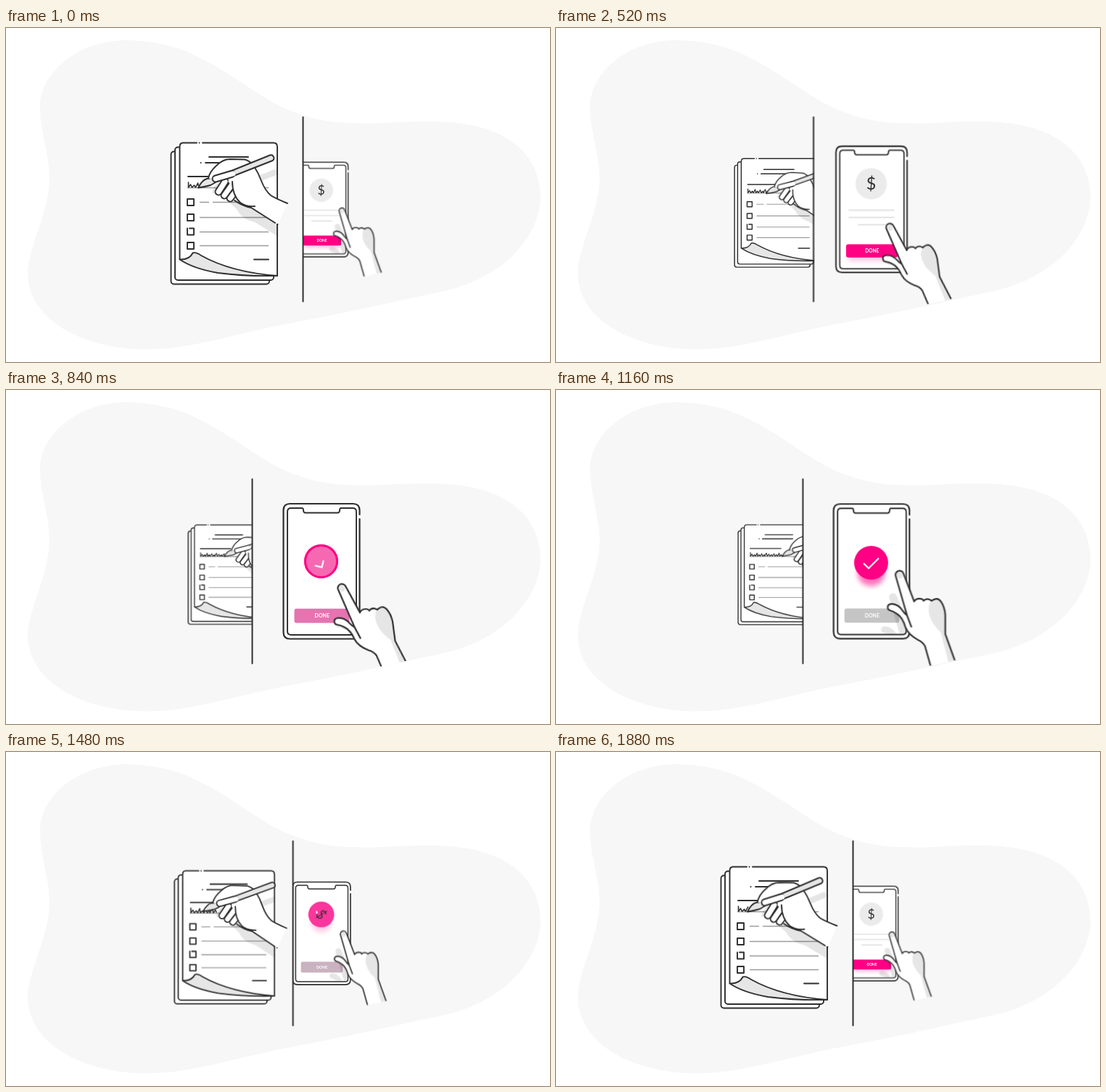
An HTML page for the animation above (1920 ms loop, 750 px wide and 461 px high).

```html
<!DOCTYPE html>
<html lang="en">
<head>
<meta charset="utf-8">
<title>Paper to phone</title>
<style>
  html, body { margin: 0; width: 100%; height: 100%; overflow: hidden; background: #fff; }
  svg { display: block; width: 750px; height: 461px; }

  .ink { stroke: #2f2f2f; stroke-width: 1.9; stroke-linecap: round; stroke-linejoin: round; fill: none; }
  .bold { stroke-width: 2.2; }
  .white { fill: #fff; }
  .grey { fill: #e6e6e6; }
  .rule { stroke: #9c9c9c; stroke-width: 1.5; fill: none; }
  .finger { stroke: #2f2f2f; stroke-width: 10.8; stroke-linecap: round; }
  .skin { stroke: #fff; stroke-width: 7; stroke-linecap: round; }
  .tint { fill: #000; stroke: none; opacity: .1; }

  .slide, .shrink, .grow, .write, .sign, .tap, .cut, .drop, .badge, .dollar, .fill, .ring,
  .check, .glow, .copy, .button, .halo {
    animation-duration: 1920ms;
    animation-iteration-count: infinite;
    animation-timing-function: linear;
    transform-box: view-box;
  }

  /* the split moves and both sides rescale together */
  .slide { animation-name: slide; }
  .shrink { animation-name: shrink; transform-origin: 308px 252px; }
  .grow { animation-name: grow; transform-origin: 435px 250.5px; }
  .slide, .shrink, .grow { animation-timing-function: cubic-bezier(.4, 0, .2, 1); }
  @keyframes slide {
    0%, 12.5%, 94.79%, 100% { transform: translateX(0); }
    41.67%, 57.81% { transform: translateX(-70px); }
  }
  @keyframes shrink {
    0%, 12.5%, 94.79%, 100% { transform: scale(1); }
    41.67%, 57.81% { transform: scale(.703); }
  }
  @keyframes grow {
    0%, 12.5%, 94.79%, 100% { transform: scale(.7); }
    41.67%, 57.81% { transform: scale(1); }
  }

  /* writing hand */
  .write { animation-name: write; transform-origin: 265px 220px; }
  @keyframes write {
    0%, 100% { transform: translate(0, 0) rotate(0deg); }
    16.67% { transform: translate(11.5px, -1.6px) rotate(3deg); }
    27.08% { transform: translate(19.6px, 1px) rotate(2deg); }
    43.75% { transform: translate(33px, 0) rotate(2deg); }
    60.42% { transform: translate(48.7px, -.5px) rotate(1deg); animation-timing-function: ease-in-out; }
    77.08% { transform: translate(4.5px, -2.5px) rotate(1.5deg); }
    97.92% { transform: translate(-1px, 0) rotate(-1deg); }
  }
  .sign { stroke-dasharray: 100 200; animation-name: sign; }
  @keyframes sign {
    0%, 100% { stroke-dashoffset: 75; }
    60.42% { stroke-dashoffset: 0; }
    77.08% { stroke-dashoffset: 38; }
    97.92% { stroke-dashoffset: 77; }
  }

  /* tapping hand, the end of its sleeve and its shadow */
  .tap { animation-name: tap; transform-origin: 508px 289px; animation-timing-function: ease-in-out; }
  @keyframes tap {
    0%, 10.4%, 97.92%, 100% { transform: translate(1.5px, -2px) rotate(0deg); }
    16.67% { transform: translate(-1.5px, 5.5px) rotate(-2deg); animation-timing-function: linear; }
    27.08% { transform: translate(-7.5px, 17px) rotate(-7.5deg); }
    31.25% { transform: translate(-8px, 18px) rotate(-8deg); }
    43.75% { transform: translate(-6.5px, 13.5px) rotate(-7.5deg); }
    60.42% { transform: translate(0, 0) rotate(0deg); }
    77.08% { transform: translate(1px, -3.5px) rotate(0deg); }
  }
  .cut { animation-name: cut; }
  @keyframes cut {
    0%, 10.4%, 97.92%, 100% { transform: translate(0, 2px); }
    16.67% { transform: translate(2.5px, 8px); }
    27.08% { transform: translate(4px, 9px); }
    31.25% { transform: translate(3px, 7px); }
    43.75% { transform: translate(-1px, 1px); }
    60.42%, 77.08% { transform: translate(0, 0); }
  }
  .drop { animation-name: drop; }
  @keyframes drop {
    0%, 10.4%, 60.42%, 100% { transform: translate(-9px, 31px); }
    27.08%, 43.75% { transform: translate(0, 3px); }
  }

  /* phone screen */
  .badge { animation-name: badge; animation-timing-function: cubic-bezier(.4, 0, .2, 1); }
  @keyframes badge {
    0%, 31.25%, 87.5%, 100% { transform: translateY(0); }
    50%, 62.5% { transform: translateY(26px); }
  }
  .dollar { animation-name: dollar; transform-origin: 434.5px 212.4px; }
  @keyframes dollar {
    0%, 31.25%, 83.3%, 100% { opacity: 1; transform: rotate(0deg); }
    37.5%, 72% { opacity: 0; transform: rotate(70deg); }
    77.08% { opacity: .9; transform: rotate(55deg); }
  }
  .fill { animation-name: fill; }
  @keyframes fill {
    0%, 33.3%, 86%, 100% { opacity: 0; }
    43.75% { opacity: .55; }
    50%, 71% { opacity: 1; }
    77.08% { opacity: .78; }
  }
  .ring { stroke-dasharray: 100; animation-name: ring; }
  @keyframes ring {
    0%, 33.3% { stroke-dashoffset: 100; opacity: 0; }
    33.4% { stroke-dashoffset: 100; opacity: 1; }
    41.67%, 50% { stroke-dashoffset: 0; opacity: 1; }
    52.1%, 100% { stroke-dashoffset: 0; opacity: 0; }
  }
  .check { stroke-dasharray: 100 200; animation-name: check; transform-origin: 434.5px 212.4px; }
  @keyframes check {
    0%, 39.5% { stroke-dashoffset: 100; opacity: 0; transform: rotate(-55deg); }
    39.6% { stroke-dashoffset: 95; opacity: 1; transform: rotate(-55deg); }
    43.75% { stroke-dashoffset: 34; opacity: 1; transform: rotate(-32deg); }
    50%, 68% { stroke-dashoffset: 0; opacity: 1; transform: rotate(0deg); }
    77.08% { stroke-dashoffset: 82; opacity: 1; transform: rotate(40deg); }
    79%, 100% { stroke-dashoffset: 100; opacity: 0; transform: rotate(45deg); }
  }
  .glow { animation-name: glow; }
  @keyframes glow {
    0%, 45.8%, 83%, 100% { opacity: 0; }
    56%, 67.7% { opacity: .55; }
    77.08% { opacity: .2; }
  }
  .copy { animation-name: copy; }
  @keyframes copy {
    0%, 29.2%, 89%, 100% { opacity: 1; }
    36.5%, 78% { opacity: 0; }
  }
  .button { animation-name: button; }
  @keyframes button {
    0%, 33.3%, 87.5%, 100% { fill: #ff0084; }
    43.75% { fill: #e573b0; }
    50%, 71% { fill: #c5c5c5; }
    77.08% { fill: #cbb3c0; }
  }
  .halo { animation-name: halo; }
  @keyframes halo {
    0%, 33.3%, 88%, 100% { opacity: .25; }
    42%, 78% { opacity: 0; }
  }
</style>
</head>
<body>
<svg viewBox="0 0 750 461" xmlns="http://www.w3.org/2000/svg">
  <defs>
    <clipPath id="leftSide"><rect class="slide" x="0" width="409.5" height="461"/></clipPath>
    <clipPath id="rightSide"><rect class="slide" x="409.5" width="500" height="461"/></clipPath>
    <clipPath id="page"><path d="M240 159H373.500V341Q300 330 258 310L240 318Z"/></clipPath>
    <clipPath id="screen"><rect x="389" y="164" width="93" height="173" rx="4"/></clipPath>
    <clipPath id="sleeve"><path class="cut" d="M300 428L640 354V100H300Z"/></clipPath>
    <filter id="soft" x="-50%" y="-50%" width="200%" height="200%"><feGaussianBlur stdDeviation="4"/></filter>
    <path id="fist" d="M279 207Q281 198 290 190Q299 181 309 181L329 181.500Q336 183 342 191Q348 200 352 211Q357 224 365 231Q371 235 388 242L375 271L338 248Q320 244 313 230L298 216Z"/>
    <path id="rod" d="M306 199L364 175.500A4.200 4.200 0 0 1 367.500 183L309 206Z"/>
    <path id="pointer" d="M522 400L509 354Q506 348 499 345Q486 338 482 328Q478 314 470 309Q466 306 461 304.500A4.600 4.600 0 0 1 461 295.500Q471 294 479 306Q481 309 484 311L468.500 257A5.600 5.600 0 0 1 479 253L494 292Q496 288 501 288Q506 288 507 291Q512 286 518 291Q526 285 531 292Q536 299 537 310L537 337L560 401"/>
  </defs>

  <path fill="#f7f7f7" d="M165 17C200 17 230 24 255 35C290 51 320 72 350 92C375 108 400 119 430 126C455 131 480 132 510 131.500C535 130 560 128.500 590 129C685 130 737 170 737 235C735 285 690 345 600 364C530 379 465 394 400 406C320 420 260 444 190 443.500C100 442 30 400 30 338C31 300 60 255 60 205C59 170 46 140 47 105C51 55 105 17 165 17Z"/>

  <g clip-path="url(#leftSide)">
    <g class="shrink">
      <rect class="ink white" x="227.500" y="170.500" width="135.500" height="183" rx="4"/>
      <rect class="ink white" x="233" y="164.500" width="136" height="183.500" rx="4"/>
      <path class="white" d="M239.500 320V164Q239.500 158.500 245 158.500H369Q374 158.500 374 164V342Q300 343 239.500 320Z"/>
      <path class="ink grey" d="M239.500 319.500Q253 320 257.500 310.500Q262 309 269 314Q310 337 374 342Q330 343 292 338Q258 332 239.500 319.500Z"/>
      <path class="ink" d="M239.500 319V164Q239.500 158.500 244 158.500H263M266.500 158.500h.1M271 158.500H369Q374 158.500 374 164V342"/>

      <path class="ink" stroke-linecap="butt" d="M280 178H334M268.500 186h.1M275 186H334M251 205H311M342 319.500H362"/>
      <path class="rule" d="M250 220.500H362M267 240.500H280M285 240.500H362M267 261.500H362M267 281.500H362M267 300.500H362"/>
      <path class="ink" stroke-linejoin="miter" d="M250 236h9v9h-9zM250 257h9v9h-9zM250 276.500v9h9v-9h-6M250 296h9v9h-9z"/>
      <path class="ink sign" pathLength="100" style="stroke-width:1.600" d="M251.500 213v7l3-4 2 4 3-3 2 3 3-6 1 6 3-3 2 3 3-5 2 5 3-3 1 3 3-6 2 6 3-4 2 4 3-3 2 3 3-5 2 5 3-3 2 3 3-6 1 6 3-3 2 3 3-2"/>

      <g clip-path="url(#page)">
        <g class="write">
          <g class="tint" transform="translate(5 20)"><use href="#fist"/><use href="#rod"/></g>
        </g>
      </g>
      <g class="write">
        <path class="ink grey" d="M265 220.500Q270 210 277 208L286 207L289 213L282 217Q275 219 265 220.500Z"/>
        <use href="#fist" class="white"/>
        <path class="finger" d="M319 222L309 235"/><path class="skin" d="M319 222L309 235"/>
        <path class="finger" d="M311 217L301 231"/><path class="skin" d="M311 217L301 231"/>
        <path class="finger" d="M302 212L293 226"/><path class="skin" d="M302 212L293 226"/>
        <path class="white" d="M306 211L340 196L358 228L343 245Q328 248 317 236L313 222Z"/>
        <path class="ink" d="M279 207Q281 198 290 190Q299 181 309 181L329 181.500Q336 183 342 191Q348 200 352 211Q357 224 365 231Q371 235 388 242M312 212Q312 231 323 241Q331 247 343 246M315 238Q326 246 338 248L371 269M374.500 271h.1"/>
        <use href="#rod" class="ink grey"/>
        <path class="finger" d="M289 208L311 201.500"/><path class="skin" d="M289 208L313 201"/>
      </g>
    </g>
  </g>

  <g clip-path="url(#rightSide)">
    <g class="grow">
      <rect class="white" x="382.500" y="157" width="105" height="186.500" rx="9"/>
      <path class="ink bold" d="M487.500 178V334.500Q487.500 343.500 478.500 343.500H391.500Q382.500 343.500 382.500 334.500V166Q382.500 157 391.500 157H478.500Q487.500 157 487.500 166V172"/>
      <path class="ink" d="M393 163H408Q410 163 410 166Q410 169.500 413 169.500H457Q460 169.500 460 166Q460 163 462 163H478Q483 163 483 168V333Q483 338 478 338H393Q388 338 388 333V168Q388 163 393 163Z"/>

      <path class="copy" stroke="#dedede" stroke-width="1.800" d="M401 251.600H469M401 262.300H469M415 273H456"/>
      <g class="badge">
        <circle class="glow" cx="434.500" cy="226" r="19" fill="#ff0084" filter="url(#soft)"/>
        <circle cx="434.500" cy="212.400" r="23.200" fill="#ebebeb"/>
        <circle class="fill" cx="434.500" cy="212.400" r="23.500" fill="#ff0084"/>
        <circle class="ring" cx="434.500" cy="212.400" r="22" pathLength="100" fill="none" stroke="#ff0084" stroke-width="3"/>
        <text class="dollar" x="434.500" y="221" text-anchor="middle" font-family="Lato, sans-serif" font-size="25" fill="#2f2f2f">$</text>
        <path class="check" pathLength="100" fill="none" stroke="#fff" stroke-width="2.200" d="M424 213L431 220L445 206"/>
      </g>

      <rect class="halo" x="400" y="308" width="71" height="18" rx="3" fill="#ff0084" filter="url(#soft)"/>
      <rect class="button" x="397.500" y="301.800" width="76" height="19.800" rx="3"/>
      <text x="435.800" y="314.400" text-anchor="middle" font-family="Lato, sans-serif" font-weight="700" font-size="7" fill="#fff">DONE</text>

      <g clip-path="url(#screen)">
        <g class="drop"><g class="tap"><use href="#pointer" class="tint"/></g></g>
      </g>
      <g clip-path="url(#sleeve)">
        <g class="tap">
          <use href="#pointer" class="white"/>
          <path class="grey" d="M514 300Q516 291 520 290Q528 287 531 292Q536 299 537 310L537 337L560 401L546 392Q537 360 531 335Q513 318 514 300Z"/>
          <ellipse class="grey" cx="474" cy="255.500" rx="3.600" ry="4.600" transform="rotate(-18 474 255.500)"/>
          <use href="#pointer" class="ink bold"/>
          <path class="ink bold" d="M484 311L490 327"/>
        </g>
      </g>
    </g>
  </g>

  <path class="ink slide" style="stroke-width:2" d="M409.500 123V377.500"/>
</svg>
</body>
</html>
```
